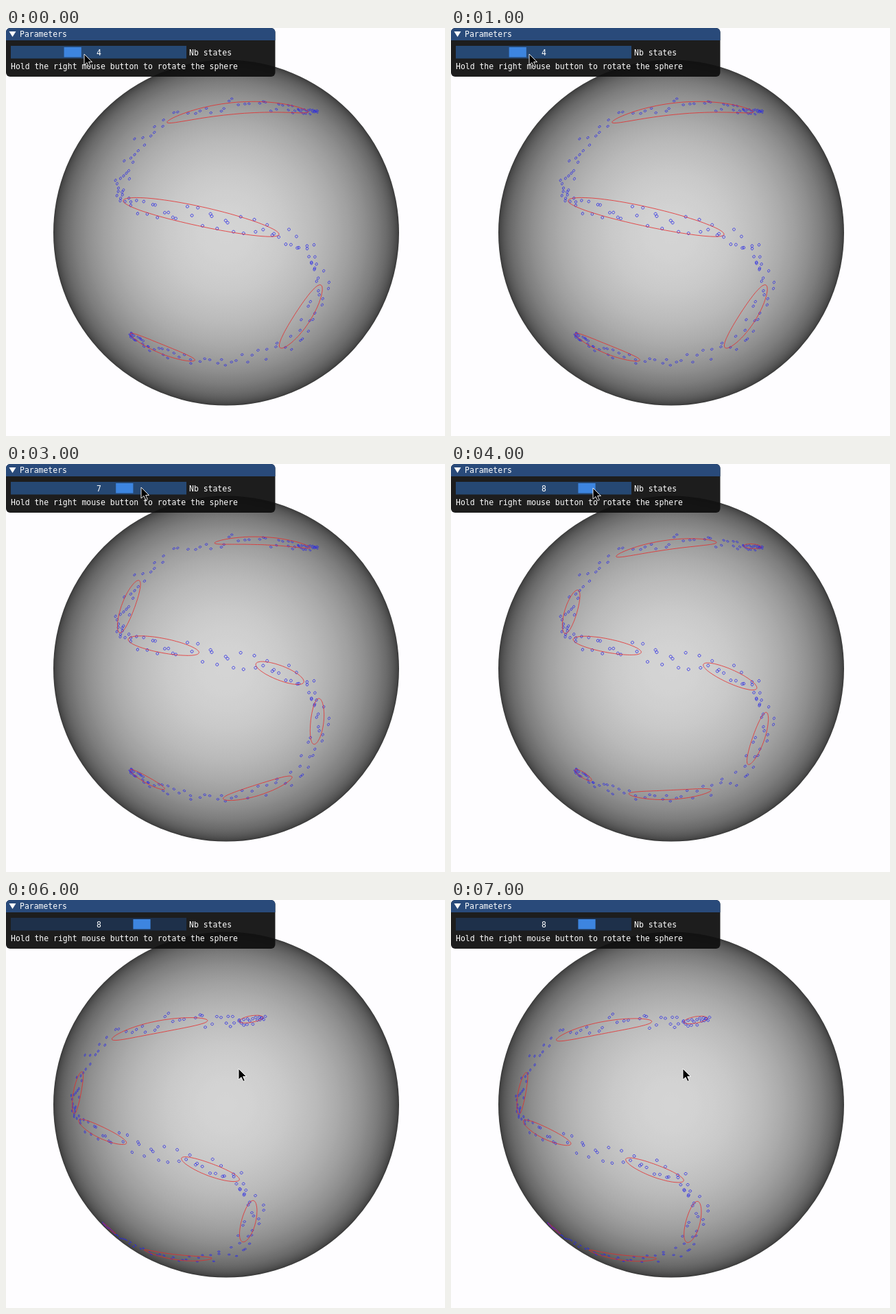
Write an HTML page that moves like this. It is 640 by 595 pixels and loops after 8 s.

```html
<!DOCTYPE html>
<html lang="en">
<head>
<meta charset="utf-8">
<title>Sphere mixture</title>
<style>
  html, body { margin: 0; width: 100%; height: 100%; overflow: hidden; background: #fefdff; }
  svg { display: block; width: 100vw; height: 100vh; }
  text { font: 11.46px "DejaVu Sans Mono", monospace; fill: #fff; white-space: pre; }
  .line { fill: none; stroke-width: .8; }
</style>
</head>
<body>
<svg viewBox="0 0 640 595" preserveAspectRatio="none">
  <defs>
    <radialGradient id="shade" gradientUnits="userSpaceOnUse" cx="321" cy="298.5" r="252"></radialGradient>
    <clipPath id="panel"><rect width="392.5" height="71" rx="6"/></clipPath>
  </defs>
  <circle cx="321" cy="298.5" r="252" fill="url(#shade)"/>
  <path id="dots" class="line" stroke="#2a2ae6"/>
  <path id="rings" class="line" stroke="#e62a2a"/>
  <g clip-path="url(#panel)">
    <rect width="393" height="72" fill="#0f0f0f" fill-opacity=".94"/>
    <rect width="393" height="18" fill="#294a7a"/>
  </g>
  <path d="M4.500 5H14.500L9.500 13Z" fill="#fff"/>
  <text x="20" y="13">Parameters</text>
  <rect id="track" x="7" y="26" width="256" height="18.500"/>
  <rect id="grab" y="28" width="25.200" height="14.500" fill="#3d85e0"/>
  <text id="value" x="132" y="39.500"></text>
  <text x="267" y="39.500">Nb states</text>
  <text x="7" y="59.500">Hold the right mouse button to rotate the sphere</text>
  <path id="cursor" d="M0 0V16L4 12.500L6.800 18.500L9.300 17.400L6.600 11.500H11.500Z"
        fill="#000" stroke="#fff" stroke-width=".9"/>
</svg>
<script>
const $ = id => document.getElementById(id);
const CX = 321, CY = 298.5, R = 252;
const EYE = 3, FOCAL = Math.sqrt(EYE * EYE - 1);
const TURN = 0.00362; // radians per dragged pixel

const dot = (a, b) => a[0] * b[0] + a[1] * b[1] + a[2] * b[2];
const scale = (a, s) => a.map(v => v * s);
const mix = (a, s, b, t) => a.map((v, i) => v * s + b[i] * t);
const unit = a => scale(a, 1 / Math.hypot(...a));
const cross = (a, b) => [
  a[1] * b[2] - a[2] * b[1],
  a[2] * b[0] - a[0] * b[2],
  a[0] * b[1] - a[1] * b[0]
];

// Screen position to the front of the unit sphere, seen in perspective
function lift([px, py]) {
  const x = (px - CX) / R / FOCAL, y = (py - CY) / R / FOCAL;
  const k = x * x + y * y;
  const z = (k * EYE + Math.sqrt(Math.max(0, 1 + k - k * EYE * EYE))) / (1 + k);
  return [x * (EYE - z), y * (EYE - z), z];
}

function project([x, y, z]) {
  const s = R * FOCAL / (EYE - z);
  return [CX + x * s, CY + y * s];
}

function rotate(p, [dx, dy]) {
  const len = Math.hypot(dx, dy);
  if (!len) return p;
  const c = Math.cos(len * TURN), s = Math.sin(len * TURN);
  const ux = dx / len, uy = dy / len;
  const a = p[0] * ux + p[1] * uy;
  const shift = a * c + p[2] * s - a;
  return [p[0] + ux * shift, p[1] + uy * shift, p[2] * c - a * s];
}

// Closed curve around c, spanned by tangents u and v through the exponential map
function loop(c, u, v, n) {
  return Array.from({ length: n }, (_, i) => {
    const a = i / n * 2 * Math.PI;
    const t = mix(u, Math.cos(a), v, Math.sin(a));
    const len = Math.hypot(...t);
    return mix(c, Math.cos(len), t, Math.sin(len) / len);
  });
}

const toPath = (loops, drag) => loops.map(l =>
  "M" + l.map(p => project(rotate(p, drag)).map(n => n.toFixed(1)).join(" ")).join("L") + "Z"
).join("");

// The drawn letter: key points half a time unit apart, 0 to 8
const keys = [
  [454, 120], [436, 122], [404, 116], [316, 113], [214, 149], [171, 213],
  [169, 250], [228, 267], [322, 282], [408, 305], [455, 340], [453, 400],
  [412, 460], [322, 488], [235, 475], [195, 455], [181, 446]
];
const END = (keys.length - 1) / 2;

// Catmull-Rom curve through the keys
function letter(t) {
  const i = Math.min(Math.floor(t * 2), keys.length - 2), f = t * 2 - i;
  const at = j => keys[Math.max(0, Math.min(keys.length - 1, j))];
  const [a, b, c, d] = [at(i - 1), at(i), at(i + 1), at(i + 2)];
  return b.map((v, k) => v + f / 2 * (c[k] - a[k]
    + f * (2 * a[k] - 5 * v + 4 * c[k] - d[k]
    + f * (3 * (v - c[k]) + d[k] - a[k]))));
}
const bulge = t => Math.sin(Math.PI * t / END);

let seed = 11;
const random = () => (seed = seed * 16807 % 2147483647) / 2147483647;

// Samples scattered across the letter, wider in the middle of the stroke
const COUNT = 190;
const dots = Array.from({ length: COUNT }, (_, i) => {
  const t = END * (i + random()) / COUNT;
  const [x, y] = letter(t);
  const near = letter(Math.max(0, t - 0.05)), far = letter(Math.min(END, t + 0.05));
  const dx = far[0] - near[0], dy = far[1] - near[1];
  const off = (2 * random() - 1) * (3 + 10 * bulge(t)) / Math.hypot(dx, dy);
  const c = lift([x - dy * off, y + dx * off]);
  const u = unit(cross(c, [0.3, 1, 0]));
  return loop(c, scale(u, 0.0058), scale(cross(c, u), 0.0058), 10);
});

// Gaussian covering the letter between two times; fewer states are wider
function ellipse([from, to], n) {
  const a = lift(letter(from)), b = lift(letter(to));
  const c = unit(mix(a, 1, b, 1));
  const u = unit(mix(b, 1, c, -dot(b, c)));
  const v = cross(c, u);
  const p = project(c), q = project(unit(mix(c, 1, v, 0.01)));
  const width = (3 + 7 * bulge((from + to) / 2)) * Math.sqrt(8 / n);
  const minor = width * 0.01 / Math.hypot(q[0] - p[0], q[1] - p[1]);
  return loop(c, scale(u, Math.acos(dot(b, c))), scale(v, minor), 90);
}

// Time span of each state along the letter
const spans = {
  4: [[0.4, 1.88], [3.03, 4.43], [5.3, 6.08], [6.75, 8]],
  5: [[0.35, 1.57], [2.2, 2.98], [3.46, 4.56], [5.27, 6.07], [6.75, 8]],
  7: [[0.33, 1.56], [2.17, 2.93], [3.12, 3.79], [4.23, 4.72], [5.02, 5.57], [5.96, 6.53], [7.03, 8]],
  8: [[0.1, 0.7], [1.12, 1.85], [2.27, 2.95], [3.12, 3.77], [4.25, 4.85], [5.2, 5.8], [6.2, 6.84], [7.33, 8]]
};
const fits = {};
for (const n in spans) fits[n] = spans[n].map(span => ellipse(span, n));

// One pose per second
const pose = (n, cursor, hover = true, drag = [0, 0]) => ({ n, cursor, hover, drag });
const poses = [
  pose(4, [114, 38]),
  pose(4, [114, 38]),
  pose(5, [162, 33]),
  pose(7, [197, 34]),
  pose(8, [207, 35]),
  pose(8, [428, 178], false),
  pose(8, [339, 246], false, [-89.3, 67.5]),
  pose(8, [338, 246], false, [-90.2, 68.7])
];

// Headlight shading: brightness follows the angle between normal and view
let stops = "";
for (let i = 0; i <= 40; i++) {
  const u = Math.sin(i / 40 * Math.PI / 2);
  const s = EYE * Math.sin(Math.atan(u / FOCAL));
  const g = Math.round(48 + 164 * Math.sqrt(Math.max(0, 1 - s * s)));
  stops += `<stop offset="${u.toFixed(4)}" stop-color="rgb(${g},${g},${g})"/>`;
}
$("shade").innerHTML = stops;

let shown = -1;
function draw(time) {
  const step = Math.floor(time % 8000 / 1000);
  if (step === shown) return;
  shown = step;
  const { n, cursor, hover, drag } = poses[step];
  $("dots").setAttribute("d", toPath(dots, drag));
  $("rings").setAttribute("d", toPath(fits[n], drag));
  $("track").setAttribute("fill", hover ? "#264873" : "#1e304a");
  $("grab").setAttribute("x", 9 + 25.2 * (n - 1));
  $("value").textContent = n;
  $("cursor").setAttribute("transform", `translate(${cursor})`);
}

const start = performance.now();
function tick() {
  draw(performance.now() - start);
  requestAnimationFrame(tick);
}
tick();
</script>
</body>
</html>
```
